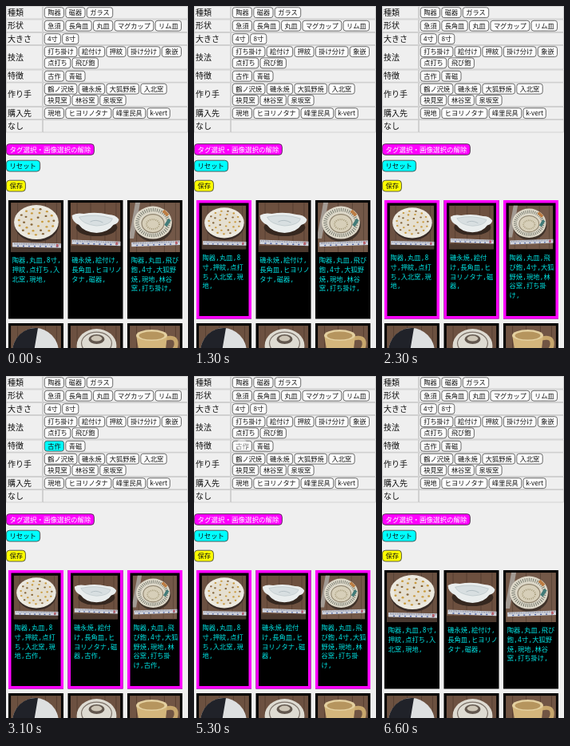
An HTML page that plays this animation: 228x428 px, repeating every 8.4 s.

```html
<!DOCTYPE html>
<html lang="ja">
<head>
<meta charset="utf-8">
<style>
  html, body { margin: 0; width: 100%; height: 100%; overflow: hidden; background: #efefef; }
  #stage { display: block; width: 228px; height: 428px; font-family: "Noto Sans CJK JP", "Noto Sans CJK", "Noto Sans", sans-serif; }
  .cell { fill: none; stroke: #c4c4c4; stroke-width: .7; }
  .label { font-size: 10px; fill: #111; }
  .tag rect { fill: #fff; stroke: #444; stroke-width: .8; }
  .tag text { font-size: 8.2px; fill: #111; text-anchor: middle; }
  .tag.on rect { fill: #0ff; }
  .btn rect { stroke: #333; stroke-width: .8; }
  .note { font: 8.25px "Noto Sans Mono", "Noto Sans CJK JP", monospace; fill: #00e4e4; }
</style>
</head>
<body>
<svg id="stage" viewBox="0 0 228 428"></svg>
<script>
const LOOP = 8400;
const NS = 'http://www.w3.org/2000/svg';
const stage = document.getElementById('stage');

function add(parent, name, attrs, text) {
  const el = document.createElementNS(NS, name);
  for (const key in attrs) el.setAttribute(key, attrs[key]);
  if (text) el.textContent = text;
  parent.appendChild(el);
  return el;
}

// label, top, bottom, lines of tags
const rows = [
  ['種類', .5, 16, ['陶器 磁器 ガラス']],
  ['形状', 17, 32.5, ['急須 長角皿 丸皿 マグカップ リム皿']],
  ['大きさ', 33.5, 48.5, ['4寸 8寸']],
  ['技法', 49.5, 79, ['打ち掛け 絵付け 押紋 掛け分け 象嵌', '点打ち 飛び鉋']],
  ['特徴', 80, 95.2, ['古作 青磁']],
  ['作り手', 96, 125.5, ['鶴ノ沢焼 磯永焼 大狐野焼 入北窯', '袂見窯 林谷窯 泉坂窯']],
  ['購入先', 126.5, 141.8, ['現地 ヒヨリノタナ 峰里民具 k-vert']],
  ['なし', 142.6, 158, []]
];
const tags = {};

function drawTag(x, y, name) {
  let units = 0;
  for (const ch of name) units += ch.charCodeAt(0) < 128 ? .5 : 1;
  if (name.includes('-')) units = 2.5;
  const w = units * 8.2 + 7.8;
  const g = add(stage, 'g', { class: 'tag' });
  add(g, 'rect', { x, y, width: w, height: 12.8, rx: 3 });
  add(g, 'text', { x: x + w / 2, y: y + 9.4 }, name);
  tags[name] = g;
  return x + w + 2.3;
}

for (const [label, top, bottom, lines] of rows) {
  add(stage, 'rect', { class: 'cell', x: .4, y: top, width: 45.2, height: bottom - top });
  add(stage, 'rect', { class: 'cell', x: 46.4, y: top, width: 181, height: bottom - top });
  add(stage, 'text', { class: 'label', x: 1.9, y: (top + bottom) / 2 + 3.6 }, label);
  lines.forEach((line, i) => {
    let x = 48.3;
    for (const name of line.split(' ')) x = drawTag(x, top + 1.3 + i * 14.2, name);
  });
}

function button(y, w, fill, ink, size, label) {
  const g = add(stage, 'g', { class: 'btn' });
  add(g, 'rect', { x: .4, y, width: w, height: 13.8, rx: 4, fill });
  add(g, 'text', { x: 4.4, y: y + 10, 'font-size': size, fill: ink }, label);
}
button(172.6, 110, '#f0f', '#fff', 8.5, 'タグ選択・画像選択の解除');
button(193.2, 42.2, '#0ff', '#111', 8.4, 'リセット');
button(218.2, 24, '#ff0', '#111', 8.4, '保存');

// Simple photo scenes in a 63 x 62 box
const oval = (p, cx, cy, rx, ry, fill, more) => add(p, 'ellipse', { cx, cy, rx, ry, fill, ...more });
const bar = (p, x, y, width, height, fill) => add(p, 'rect', { x, y, width, height, fill });
const path = (p, d, fill, more) => add(p, 'path', { d, fill, ...more });

function table(p, base, seam) {
  bar(p, 0, 0, 63, 62, base);
  for (const x of [8, 25, 43, 57]) bar(p, x, 0, 1, 62, seam);
}

function ruler(p, y, tilt) {
  const g = add(p, 'g', { transform: `rotate(${tilt} 32 ${y})` });
  bar(g, 2, y, 64, 5.5, '#d3d6df');
  path(g, `M4 ${y + 1.5}H63`, 'none', { stroke: '#555a70', 'stroke-width': 2, 'stroke-dasharray': '.6 1.6' });
  path(g, `M8 ${y + 4.2}H63`, 'none', { stroke: '#465a9a', 'stroke-width': 1.4, 'stroke-dasharray': '2 5' });
  bar(g, 57, y + 1, 3, 3.5, '#b8616a');
}

const scenes = [
  p => {
    table(p, '#6b5141', '#584236');
    bar(p, 0, 55, 63, 7, '#493930');
    oval(p, 32.5, 27, 28, 22, '#382b25');
    oval(p, 32, 24.5, 28, 21.5, '#ece9df');
    oval(p, 32, 24, 23, 17, '#e5dfd0');
    for (const [n, r] of [[5, .3], [10, .62], [15, .88]])
      for (let i = 0; i < n; i++) {
        const a = i / n * Math.PI * 2 + n;
        oval(p, 32 + Math.cos(a) * 25 * r, 24 + Math.sin(a) * 18.5 * r, 1.5, 1.2, i % 3 ? '#c89a3e' : '#85653a');
      }
    ruler(p, 50.5, 1);
  },
  p => {
    table(p, '#6d503f', '#573f32');
    bar(p, 0, 54, 63, 8, '#4b382d');
    oval(p, 33, 31, 26, 11, '#35271f');
    path(p, 'M2 16Q8 12 17 14Q32 11 48 15Q57 15 61 21Q61 26 54 28Q48 37 33 38Q17 37 11 28Q2 24 2 16Z', '#e9eded');
    path(p, 'M11 18Q32 13 53 20Q51 28 33 29Q15 27 11 18Z', '#d8dfe1', { stroke: '#b8c3c6', 'stroke-width': .7 });
    path(p, 'M25 24Q32 20 41 25', 'none', { stroke: '#a9b6bc', 'stroke-width': .8 });
    ruler(p, 47.5, 2);
  },
  p => {
    table(p, '#735848', '#5c4637');
    path(p, 'M7 0H13L5 45H0V38Z', '#a39b94');
    oval(p, 30, 28, 24, 21, '#40332a');
    oval(p, 29, 25, 24, 20.5, '#ddd8c9');
    oval(p, 29, 25, 19.5, 16, 'none', { stroke: '#777b70', 'stroke-width': 4.5, 'stroke-dasharray': '1 1.6' });
    oval(p, 29, 26, 14, 11.5, '#d7cfb9', { stroke: '#8e836e', 'stroke-width': 1.2 });
    oval(p, 29, 27, 8, 6, 'none', { stroke: '#a59a7a', 'stroke-width': 2, 'stroke-dasharray': '1 1.4' });
    path(p, 'M42 10L48 16', 'none', { stroke: '#bd7d43', 'stroke-width': 4 });
    path(p, 'M45 29L50 21', 'none', { stroke: '#427b78', 'stroke-width': 4 });
    ruler(p, 48.5, -2);
  },
  p => {
    table(p, '#6c5140', '#553f32');
    oval(p, 31, 33, 29, 30, '#dddfe0');
    path(p, 'M34 3A29 30 0 0 0 2 34V62H24Z', '#202229');
  },
  p => {
    table(p, '#6d5141', '#563f32');
    oval(p, 33, 25, 25, 21, '#dedbd2');
    oval(p, 33, 22, 19, 14, 'none', { stroke: '#7d736a', 'stroke-width': 1.2 });
    oval(p, 33, 17, 10, 6, '#62574e');
    oval(p, 33, 16, 7, 3.5, '#cdc5b6');
  },
  p => {
    table(p, '#715544', '#593f31');
    path(p, 'M45 16Q60 12 58 25Q56 34 44 32', 'none', { stroke: '#c8a76d', 'stroke-width': 5 });
    path(p, 'M8 12H47L43 48H14Z', '#d4b67c');
    oval(p, 27.5, 12, 19.5, 7, '#e4d0a0');
    oval(p, 27.5, 12.5, 16, 5, '#b6955e');
  }
];

// Text lines: unselected, then selected
const notes = [
  ['陶器,丸皿,8寸,|押紋,点打ち,入|北窯,現地,', '陶器,丸皿,8|寸,押紋,点打|ち,入北窯,現|地,'],
  ['磯永焼,絵付け,|長角皿,ヒヨリノ|タナ,磁器,', '磯永焼,絵付|け,長角皿,ヒ|ヨリノタナ,磁|器,'],
  ['陶器,丸皿,飛び|鉋,4寸,大狐野|焼,現地,林谷|窯,打ち掛け,', '陶器,丸皿,飛|び鉋,4寸,大狐|野焼,現地,林|谷窯,打ち掛|け,']
];

function writeNote(parent, x, y, text) {
  return text.split('|').map((line, i) =>
    add(parent, 'text', { class: 'note', x, y: y + i * 11.65 }, line));
}

function face(x, y, scene, inset, text, frame) {
  const g = add(stage, 'g', {});
  bar(g, x, y, 69, 148.5, '#000');
  if (frame) add(g, 'rect', { x: x + 1.75, y: y + 1.75, width: 65.5, height: 145, fill: 'none', stroke: '#f0f', 'stroke-width': 3.5 });
  const photo = add(g, 'svg', {
    x: x + inset, y: y + inset, width: 69 - 2 * inset, height: 68.2 - 2 * inset,
    viewBox: '0 0 63 62', preserveAspectRatio: 'none'
  });
  scene(photo);
  const lines = text ? writeNote(g, x + (frame ? 7.5 : 4.8), frame ? 318.3 : 321.2, text) : [];
  return { g, last: lines[lines.length - 1] };
}

const cards = scenes.map((scene, i) => {
  const x = 3 + (i % 3) * 74.5;
  if (i > 2) return face(x, 397, scene, 3.1);
  return {
    plain: face(x, 243, scene, 3.1, notes[i][0]),
    chosen: face(x, 243, scene, 6.6, notes[i][1], true),
    tail: notes[i][1].split('|').pop()
  };
}).slice(0, 3);

const chosenAt = [1200, 1700, 2000];
const clearedAt = 6400;
const tagTimes = { 古作: [2700, 5300], 青磁: [3400, 4700] };
// x, y, start, end
const touches = [
  [38, 278, 1100, 1300], [113, 278, 1500, 1800], [191, 271, 1900, 2100],
  [60, 86, 2600, 2900], [94, 86.5, 3300, 3500], [96.5, 86.5, 4500, 4900],
  [60, 86, 5200, 5500], [88, 180, 6200, 6500]
];
const finger = add(stage, 'circle', { r: 7, fill: '#fff', opacity: .5 });

const within = (t, a, b) => t >= a && t < b;
const show = (el, on) => el.setAttribute('visibility', on ? 'visible' : 'hidden');

function draw(t) {
  let extra = '';
  for (const name in tagTimes) {
    const on = within(t, ...tagTimes[name]);
    tags[name].classList.toggle('on', on);
    if (on) extra += name + ',';
  }
  cards.forEach((card, i) => {
    const on = within(t, chosenAt[i], clearedAt);
    show(card.plain.g, !on);
    show(card.chosen.g, on);
    card.chosen.last.textContent = card.tail + extra;
  });
  const touch = touches.find(([, , a, b]) => within(t, a, b));
  show(finger, touch);
  if (touch) {
    finger.setAttribute('cx', touch[0]);
    finger.setAttribute('cy', touch[1]);
  }
}

const start = performance.now();
function tick() {
  draw((performance.now() - start) % LOOP);
  requestAnimationFrame(tick);
}
tick();
</script>
</body>
</html>
```
